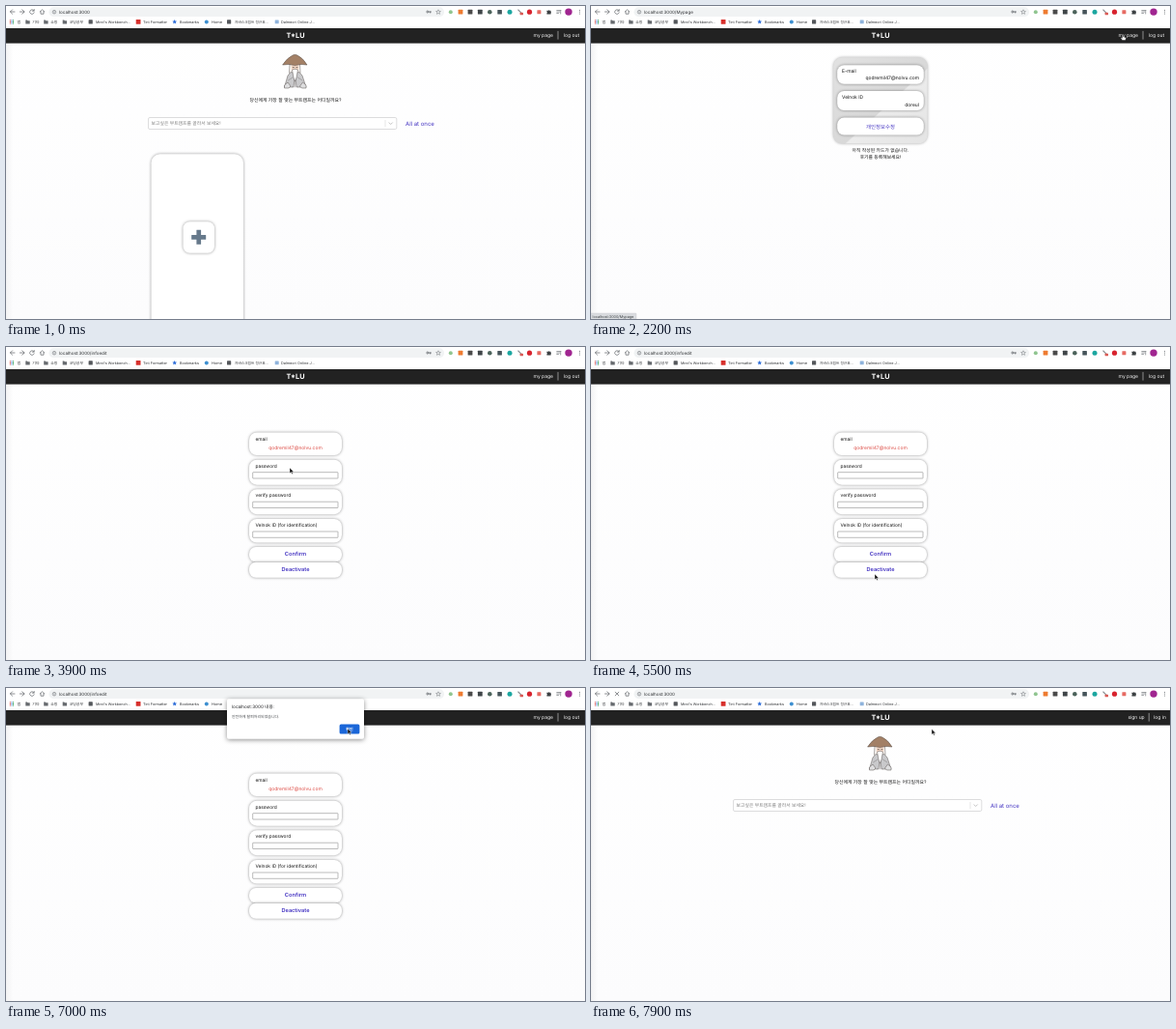
These frames come from a looping animation (600x324 px, 8000 ms). An HTML page:

```html
<!DOCTYPE html>
<html>
<head>
<meta charset="utf-8">
<title>Bootcamp review site</title>
<style>
  html, body { margin: 0; width: 100%; height: 100%; overflow: hidden; background: #fff; }
  svg { display: block; width: 100%; height: 100%; }
  text {
    font-family: Inter, "Noto Sans CJK KR", "Noto Sans CJK", "Noto Sans", sans-serif;
    text-rendering: geometricPrecision;
  }
  .card { fill: #fff; filter: drop-shadow(0 0 1.4px rgba(0, 0, 0, .42)); }
  .line { fill: none; stroke-linecap: round; stroke-linejoin: round; }
</style>
</head>
<body>
<svg id="stage" viewBox="0 0 600 324">
  <defs>
    <linearGradient id="paper" x1="0" y1="0" x2="0" y2="1">
      <stop offset="0" stop-color="#fff"/><stop offset="1" stop-color="#fcfcfd"/>
    </linearGradient>
    <linearGradient id="edge">
      <stop offset="0" stop-color="#f3f3f4"/><stop offset="1" stop-color="#f3f3f4" stop-opacity="0"/>
    </linearGradient>
    <linearGradient id="steel" x1="0" y1="0" x2="1" y2="1">
      <stop offset="0" stop-color="#e2e2e2"/><stop offset=".56" stop-color="#d8d8d8"/>
      <stop offset=".57" stop-color="#ececec"/><stop offset="1" stop-color="#e4e4e4"/>
    </linearGradient>
  </defs>
</svg>
<script>
const LOOP = 8000;
const INK = '#111', LINK = '#4434c2', GREY = '#5f6368';
const EMAIL = 'qodremil47@nolvu.com';
const stage = document.getElementById('stage');

function add(parent, tag, attrs) {
  const el = document.createElementNS('http://www.w3.org/2000/svg', tag);
  for (const key in attrs) el.setAttribute(key, attrs[key]);
  return parent.appendChild(el);
}
const group = parent => add(parent, 'g', {});
function rect(p, x, y, w, h, rx, fill, more) {
  return add(p, 'rect', { x, y, width: w, height: h, rx, fill, ...more });
}
const card = (p, x, y, w, h, rx) => rect(p, x, y, w, h, rx, '#fff', { class: 'card' });
const dot = (p, cx, cy, r, fill) => add(p, 'circle', { cx, cy, r, fill });
const shape = (p, d, fill, more) => add(p, 'path', { d, fill, ...more });
const line = (p, d, stroke, w = 0.7) =>
  add(p, 'path', { d, stroke, 'stroke-width': w, class: 'line' });
function text(p, str, x, y, size, fill = INK, anchor = 'start', weight = 400) {
  const el = add(p, 'text', {
    x, y, fill, 'font-size': size, 'text-anchor': anchor, 'font-weight': weight
  });
  el.textContent = str;
  return el;
}
const show = (el, on) => { el.style.display = on ? '' : 'none'; };

// Page background
rect(stage, 0, 0, 600, 324, 0, 'url(#paper)');
rect(stage, 0, 38, 7, 286, 0, 'url(#edge)');

// Landing page
const home = group(stage);
function drawMascot(p) {
  const pen = { stroke: '#4b4542', 'stroke-width': 0.45, 'stroke-linejoin': 'round' };
  shape(p, 'M294 60L293.5 69L296 72H303L305 69L304.5 60Z', '#fbf6f2', pen);
  shape(p, 'M295.5 61H303.5L303 66Q299.5 69 296 66Z', '#f1d5c4');
  shape(p, 'M295.5 68L292 72L288.5 84H298L299.5 71Z', '#c9c9cb', pen);
  shape(p, 'M303.5 68L307 72L311 84H301L299.5 71Z', '#c9c9cb', pen);
  shape(p, 'M296.5 66Q299.5 64.5 302.5 66L301 74L299.5 78L298 74Z', '#fff', pen);
  shape(p, 'M288.5 82L292 79L295 83L293 85H288.5ZM311 82L307.5 79L304.5 83L306.5 85H311Z', '#dededf', pen);
  line(p, 'M292.5 77L297 74M307 77L302.5 74M299.5 78V84', '#6b6868', 0.4);
  line(p, 'M297.2 63.6H298.4M300.8 63.6H302', '#3c3431', 0.6);
  shape(p, 'M286.6 61Q291 54 297 51Q299.3 49.6 302 51Q308 54 312 61Q306 59.5 299.5 61.6Q293 59.5 286.6 61Z', '#a38066', pen);
}
drawMascot(home);
text(home, '당신에게 가장 잘 맞는 부트캠프는 어디일까요?', 300, 99, 4.93, INK, 'middle');
rect(home, 147.5, 115.5, 257.3, 12, 1.5, '#fff', { stroke: '#c6c6c8', 'stroke-width': 0.6 });
text(home, '보고싶은 부트캠프를 골라서 보세요!', 150.6, 123.2, 4.83, '#7c7c7c');
line(home, 'M393 118.4V124.8', '#ccc', 0.5);
line(home, 'M397 120.8L398.7 122.5L400.4 120.8', '#b5b5b5', 0.8);
text(home, 'All at once', 414, 124.1, 6, LINK);
const picker = group(home);
card(picker, 150.5, 153.3, 95.5, 190, 9);
card(picker, 183.5, 223.3, 32.5, 32.5, 7);
rect(picker, 192.2, 237, 15, 4.7, 0.3, '#66798b');
rect(picker, 197.4, 231.8, 4.7, 15, 0.3, '#66798b');

// Profile page
const profile = group(stage);
rect(profile, 251.2, 53.3, 97.4, 89, 9, 'url(#steel)', { class: '' })
  .style.filter = 'drop-shadow(0 0 1.4px rgba(0,0,0,.35))';
for (const [y, h] of [[61.3, 19.5], [88, 20], [115.6, 18]]) card(profile, 255.2, y, 89.6, h, 7);
text(profile, 'E-mail', 260, 69.2, 4.95);
text(profile, EMAIL, 340, 76.2, 4.95, INK, 'end');
text(profile, 'Velnok ID', 260, 96.3, 4.95);
text(profile, 'doreul', 340, 103.5, 4.95, INK, 'end');
text(profile, '개인정보수정', 300, 127, 5.4, LINK, 'middle');
text(profile, '아직 작성된 카드가 없습니다.', 300, 151.2, 4.84, INK, 'middle');
text(profile, '후기를 등록해보세요!', 300, 158, 4.84, INK, 'middle');

// Account form
const form = group(stage);
const fields = [
  ['email', 88.5, 23.5], ['password', 116.7, 26],
  ['verify password', 147.2, 26], ['Velnok ID (for identification)', 178, 24.5]
];
fields.forEach(([label, y, h], i) => {
  card(form, 252, y, 96, h, 8);
  text(form, label, 258.5, y + 8, 4.85);
  if (i) rect(form, 255.7, y + 13, 88.3, 6.3, 0.4, '#fff', { stroke: '#767676', 'stroke-width': 0.5 });
});
text(form, EMAIL, 300, 106.2, 4.95, '#dc4a43', 'middle');
card(form, 252, 207, 96, 15.6, 7);
card(form, 252, 222.8, 96, 16, 7);
const focus = rect(form, 252, 222.9, 96, 15.8, 1.2, 'none', { stroke: '#ea8450', 'stroke-width': 0.9 });
text(form, 'Confirm', 300, 216.4, 5.7, LINK, 'middle', 600);
text(form, 'Deactivate', 300, 232.4, 5.6, LINK, 'middle', 600);

// Browser toolbar
const bar = group(stage);
rect(bar, 0, 0, 600, 23, 0, '#fff');
line(bar, 'M9 6H4.4M6.6 3.8L4.4 6L6.6 8.2', GREY);
line(bar, 'M14.4 6H19M16.8 3.8L19 6L16.8 8.2', GREY);
const reload = line(bar, 'M28.8 4.6A2.3 2.3 0 1 0 29.2 6.8M29.2 3.5V5.2H27.5', GREY);
const stop = line(bar, 'M25.2 4.2L28.8 7.8M28.8 4.2L25.2 7.8', GREY);
line(bar, 'M35.2 6L37.5 3.8L39.8 6M36 5.6V8.2H39V5.6', GREY);
rect(bar, 44.5, 1.3, 409.5, 9.8, 4.9, '#f1f3f4');
add(bar, 'circle', { cx: 50, cy: 6.2, r: 1.8, stroke: GREY, 'stroke-width': 0.5, fill: 'none' });
line(bar, 'M50 6V7.1M50 5.1V5.2', GREY, 0.5);
const url = text(bar, '', 55, 7.9, 4.5, '#2b2d30');
add(bar, 'circle', { cx: 436.8, cy: 6, r: 1, stroke: GREY, 'stroke-width': 0.8, fill: 'none' });
line(bar, 'M438 6H440.4M439.7 6V7', GREY, 0.8);
const STAR = 'M0 -2.4L.7 -.8L2.4 -.7L1.1 .4L1.5 2.1L0 1.2L-1.5 2.1L-1.1 .4L-2.4 -.7L-.7 -.8Z';
add(bar, 'path', { d: STAR, transform: 'translate(448 6.2)', stroke: GREY, 'stroke-width': 0.45, fill: 'none' });

// Extension buttons: x, colour, half size, round
for (const [x, fill, r, round] of [
  [460.8, '#8fc58f', 2, 1], [471, '#ee7b30', 2.4, 0], [481, '#4a4a4a', 2.4, 0],
  [491.3, '#3f4548', 2.4, 0], [501.3, '#4c635b', 2.3, 1], [511.6, '#46545a', 2.3, 0],
  [522, '#1ba6a0', 2.5, 1], [542.5, '#d8232e', 2.6, 1], [552.4, '#e66a62', 2, 0]
]) {
  if (round) dot(bar, x, 6.2, r, fill);
  else rect(bar, x - r, 6.2 - r, 2 * r, 2 * r, 0.5, fill);
}
line(bar, 'M530.8 4L534.2 7.4', '#8a8d91', 1.1);
rect(bar, 532.6, 6.7, 3.4, 2.6, 0.5, '#d95a55');
shape(bar, 'M560.4 4.7H561.8A.9 .9 0 0 1 563.4 4.7H564.6V6A.9 .9 0 0 1 564.6 7.4V8.6H560.4V7.3A.7 .7 0 0 0 560.4 6Z', '#3c4043');
line(bar, 'M570.8 4.5H575M570.8 6H573.5M570.8 7.5H572.5M574.7 5V8', GREY, 0.6);
dot(bar, 583, 6.1, 3.7, '#a02590');
for (const y of [4.3, 6.1, 7.9]) dot(bar, 594.5, y, 0.5, GREY);

// Bookmarks
const tints = ['#e5574f', '#4c8bf5', '#39a45b'];
for (let i = 0; i < 9; i++) {
  rect(bar, 3.8 + (i % 3) * 1.6, 14.3 + Math.floor(i / 3) * 1.6, 1.1, 1.1, 0, tints[i % 3]);
}
const mark = (str, x, size = 3.9) => text(bar, str, x, 17.9, size, '#2f3134');
mark('앱', 11.5);
for (const [x, str] of [[20.3, '기타'], [39.2, '쇼핑'], [58.7, '코딩공부']]) {
  shape(bar, `M${x} 14.6h1.6l.6 .6h2.2v3.3h-4.4z`, '#666a6e');
  mark(str, x + 7);
}
rect(bar, 85.6, 14.3, 4.2, 4.2, 0.6, '#55585c');
mark("Mirel's Workbench...", 93, 3.7);
rect(bar, 134.7, 14, 4.8, 4.8, 0.5, '#d7302c');
mark('Tint Formatter', 142, 3.75);
add(bar, 'path', { d: STAR, transform: 'translate(174.7 16.4)', fill: '#2b6cd8' });
mark('Bookmarks', 180, 3.75);
dot(bar, 207.8, 16.4, 2, '#3d8fd0');
mark('Home', 213, 3.9);
rect(bar, 229, 14.3, 4.2, 4.2, 0.6, '#55585c');
mark('자바스크립트 정규표...', 237, 3.7);
rect(bar, 278.7, 14.6, 4, 3.6, 0.5, '#8fb3dc');
mark('Dalmeori Online J...', 285, 3.8);

// Site header
rect(stage, 0, 23, 600, 15.6, 0, '#222');
text(stage, 'T*LU', 300, 32.8, 7.3, '#fff', 'middle', 700);
function nav(x1, str1, bar, x2, str2) {
  const g = group(stage);
  text(g, str1, x1, 32, 5, '#f4f4f4');
  line(g, `M${bar} 26.3V34.2`, '#d8d8d8', 0.6);
  text(g, str2, x2, 32, 5, '#f4f4f4');
  return g;
}
const member = nav(546.6, 'my page', 572, 577.8, 'log out');
const guest = nav(556.4, 'sign up', 578.2, 583, 'log in');

// Link preview in the lower corner
const status = group(stage);
const statusBox = rect(status, -1, 318, 48, 7, 0.8, '#dadce0', { stroke: '#c4c6c9', 'stroke-width': 0.4 });
text(status, 'localhost:3000/Mypage', 1.5, 322.5, 3.8, '#3c4043');

// Alert
const alertBox = group(stage);
rect(alertBox, 229, 11.3, 142, 41.4, 1.8, '#fff')
  .style.filter = 'drop-shadow(0 1px 2.5px rgba(0,0,0,.45))';
text(alertBox, 'localhost:3000 내용:', 234, 21.4, 4.65, '#1d1e20');
const message = text(alertBox, '', 234, 30.5, 3.95, '#45484c');
rect(alertBox, 345.6, 37.4, 20.8, 10.2, 1.5, '#1a66d8');
text(alertBox, '확인', 356, 44, 4, '#fff', 'middle', 600);

// Pointers
const arrow = shape(stage, 'M0 0V5.8L1.4 4.6L2.3 6.6L3.3 6.2L2.4 4.2H4.2Z', '#111',
  { stroke: '#fff', 'stroke-width': 0.4 });
const hand = shape(stage, 'M-.6 .3Q0 -.5 .6 .3V2.3L3 2.9Q3.6 3.2 3.4 4.2L2.8 6H-.4L-2.2 3.6Q-2 2.9 -1.2 3.2L-.6 3.8Z', '#fff',
  { stroke: '#111', 'stroke-width': 0.45 });

// time, x, y
const path = [
  [0, 500, -10], [850, 500, -10], [1300, 551, 29.5], [2520, 551, 29.5],
  [2900, 294, 125], [4150, 294, 125], [4300, 274, 136], [4450, 274, 136],
  [5000, 288, 266], [5150, 288, 266], [5450, 294, 235], [6080, 294, 235],
  [6200, 322, 91], [6300, 329, 69], [6450, 330, 68], [6700, 354, 42],
  [7650, 354, 42], [7750, 353, 42.5], [8000, 353, 42.5]
];
function cursorAt(t) {
  let i = 1;
  while (path[i][0] <= t && i < path.length - 1) i++;
  const [t0, x0, y0] = path[i - 1], [t1, x1, y1] = path[i];
  const k = Math.min(1, (t - t0) / (t1 - t0));
  return [x0 + (x1 - x0) * k, y0 + (y1 - y0) * k];
}

const pages = [[0, ''], [2000, 'Mypage'], [3500, 'infoedit'], [7700, '']];
const within = (t, a, b) => t >= a && t < b;
const clamp = v => Math.max(0, Math.min(1, v));

function render(t) {
  const page = pages.filter(p => p[0] <= t).pop()[1];
  const left = t >= 7700;
  url.textContent = 'localhost:3000' + (page && '/' + page);
  show(home, !page);
  show(picker, !left);
  show(profile, page === 'Mypage');
  show(form, page === 'infoedit');
  show(member, !left);
  show(guest, left);
  show(reload, !left);
  show(stop, left);

  const asking = within(t, 5700, 6900);
  show(focus, asking);
  show(alertBox, within(t, 5700, 7700));
  message.textContent = asking ? '회원을 탈퇴하시겠습니까?' : '안전하게 탈퇴처리되었습니다.';

  show(status, within(t, 1300, 3200));
  statusBox.setAttribute('width', 48 + 153 * clamp((t - 2300) / 200));
  status.setAttribute('opacity', 1 - clamp((t - 2800) / 300));

  const [x, y] = cursorAt(t);
  const onLink = within(t, 1250, 2560);
  for (const c of [arrow, hand]) c.setAttribute('transform', `translate(${x} ${y})`);
  show(hand, onLink);
  show(arrow, !onLink);
}

const start = performance.now();
function tick() {
  render((performance.now() - start) % LOOP);
  requestAnimationFrame(tick);
}
tick();
</script>
</body>
</html>
```
